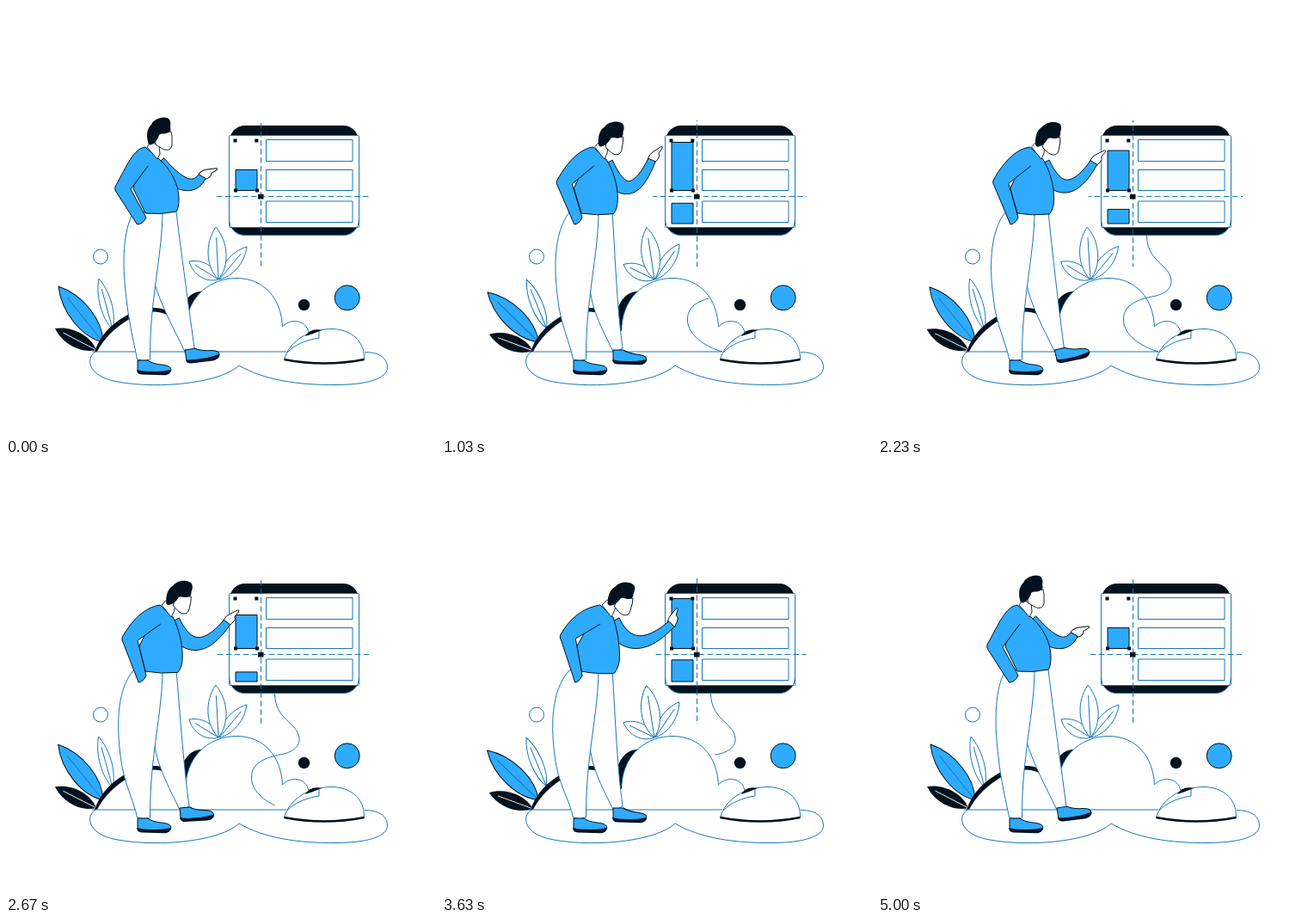
Write an HTML page that moves like this. It is 500 px wide and 500 px high and loops after 5.03 s.

```html
<!DOCTYPE html>
<html lang="en">
<head>
<meta charset="utf-8">
<title>Interface designer</title>
<style>
  html, body { margin: 0; height: 100%; overflow: hidden; background: #fff; }
  svg { display: block; width: 100vw; height: 100vh; }
  .line { fill: none; stroke: #0b70b5; stroke-width: .95; }
  .white { fill: #fff; stroke: #0b70b5; stroke-width: .95; }
  .blue { fill: #2eabff; stroke: #00121e; stroke-width: 1; stroke-linejoin: round; }
  .skin { fill: #fff; stroke: #00121e; stroke-width: .9; stroke-linejoin: round; }
  .dark { fill: #00121e; }
  .ink { fill: none; stroke: #00121e; stroke-width: 1; }
</style>
</head>
<body>
<svg viewBox="0 0 500 500">
  <g id="plantL"></g>
  <g id="plantR"></g>

  <!-- ground and hills -->
  <path class="line" d="M104 402C92 410 95 431 130 437C180 446 250 438 271 418C300 435 340 441 385 440.500C430 440 443.500 430 443.500 420C443 408 432 402.500 417 402.500"/>
  <path class="dark" d="M103 402C112 373 145 351 172 351C184 351 196 356 212 376V402Z"/>
  <path fill="#fff" d="M106 402C116 381 145 356.500 172 355.500C187 356 198 364 212 382V402Z"/>
  <path class="dark" d="M200 375C202 343 214 330 233 331.500L214 375Z"/>
  <path fill="#fff" d="M209 402V372C212 335 240 316.500 268 316.500C300 316.500 320 340 322 372V402Z"/>
  <path class="line" d="M209 372C212 335 240 316.500 268 316.500C300 316.500 320 340 321.500 373C330 363 349 364 352 380M100 402H326"/>
  <path id="cable" class="line" pathLength="1" d="M326 402C305 396 285.500 382 285.500 365C285 346 305 341 318 338C332 336 342 329 341 319C339 300 313 298 312.500 267"/>

  <!-- mouse -->
  <path class="white" d="M323.500 411C329 391 350 375.500 380 375.500C407 377 417 394 416.500 411Q370 420 323.500 411Z"/>
  <path d="M323.500 411Q370 420 416.500 411" fill="none" stroke="#00121e" stroke-width="2.400"/>
  <path class="line" d="M327 403C335 394 350 388 364 386V378"/>
  <path class="dark" d="M348 384Q354 374 367 377L357 381Z"/>

  <circle class="white" cx="110" cy="291.500" r="8.500"/>
  <circle class="dark" cx="346.500" cy="347.500" r="6.700"/>
  <circle class="blue" cx="396.700" cy="339.300" r="14.500"/>

  <!-- screen -->
  <rect class="dark" x="260" y="139" width="150" height="127.500" rx="18"/>
  <rect class="white" x="259.500" y="150.500" width="151" height="107" rx="1"/>
  <path class="line" d="M259.500 248C260 259 267 266.500 278 266.500H392C403 266.500 410 259 410.500 248M302.500 155.500H403V180.500H302.500ZM302.500 190.500H403V214.500H302.500ZM302.500 227H403V251.500H302.500Z"/>
  <rect id="barTop" class="blue" x="267" width="25"/>
  <rect id="barLow" class="blue" x="267" width="25"/>
  <path class="dark" d="M264.500 154.500h4v4h-4zM289.300 154.500h4v4h-4zM265 212.500h4v4h-4zM290 212.500h4v4h-4z"/>
  <g class="line" stroke-dasharray="6.500 3.500">
    <path id="dashH" d="M245 221.500H424"/>
    <path id="dashV" d="M296.500 133V303"/>
  </g>
  <rect class="dark" x="293" y="218.800" width="6.500" height="5.700"/>

  <!-- man -->
  <path id="legFront" class="white"/>
  <g id="shoeFront"></g>
  <path id="legBack" class="white"/>
  <g id="shoeBack" transform="translate(153 412)"></g>
  <path id="hand" class="skin" d="M-2 -4.500Q5 -6.500 9 -4.500L19 -1Q20.500 .5 18 1L11 1.500Q10 5 5 5L-2 4.500Z"/>
  <path id="armFar" class="blue"/>
  <path id="torso" class="blue"/>
  <path id="neck" class="skin"/>
  <path id="armNear" class="blue"/>
  <path id="crease" class="ink"/>
  <g id="head">
    <path class="skin" d="M-4 2L14 1L15 7V17C14 23 8 24 2 20L-4 16Z"/>
    <path class="dark" d="M-13 13C-15 5 -14 -3 -9 -7C-7 -13 3 -17 9 -15C13 -14 14 -9 13 -5C14 -1 13 2 11 2C6 5 3 2 0 5C-1 10 -6 16 -10 16.500C-12 16 -13 15 -13 13Z"/>
  </g>
</svg>
<script>
const LOOP = 5030, HALF = LOOP / 2;
const $ = id => document.getElementById(id);
const set = (id, attrs) => {
  for (const k in attrs) $(id).setAttribute(k, attrs[k]);
};

function leaf(x, y, tx, ty, w, cls, vein = 'line') {
  const dx = tx - x, dy = ty - y, l = Math.hypot(dx, dy);
  const at = (k, side) => `${x + dx * k - dy / l * w * side} ${y + dy * k + dx / l * w * side}`;
  return `<path class="${cls}" d="M${x} ${y}C${at(.25, 1)} ${at(.7, 1)} ${tx} ${ty}C${at(.7, -1)} ${at(.25, -1)} ${x} ${y}Z"/>
    <path class="line" ${vein} d="M${x} ${y}L${at(.8, 0)}"/>`;
}
$('plantL').innerHTML = leaf(124, 376, 108, 317, 9, 'white', '')
  + leaf(105, 400, 57, 375, 12, 'dark', 'style="stroke:#fff"')
  + leaf(113, 391, 61, 326, 16, 'blue', '');
$('plantR').innerHTML = leaf(247, 318, 213, 297, 11, 'white', '')
  + leaf(248, 318, 280, 280, 10, 'white', '')
  + leaf(247, 318, 244, 257, 14, 'white', '');

$('shoeFront').innerHTML = $('shoeBack').innerHTML =
  '<path class="blue" d="M0 0H12C20 6 30 4 36 7C40 9 39 13 37 14L0 13Z"/>' +
  '<path class="dark" d="M-.5 11C10 14.500 25 13.500 39 11C38.500 15 36 17.300 30 17.300L5 16.500C1 16 -1 14.500 -.5 11Z"/>';

// Pose keys, joined by a cyclic monotone cubic
const TIMES = [0, 1030, 1770, 2670, 3630, 4370];
const POSE = {
  lean:   [0, 13.5, 13, 17, 22, 14.5],
  bar:    [24, 56, 55, 39, 58, 45],
  wristX: [228, 244, 246, 257, 267, 253],
  wristY: [198, 179, 180, 184, 186, 187],
  point:  [-26, -52, -45, -45, -70, -28],
  elbowX: [208, 217, 217, 222, 227, 221],
  elbowY: [207, 211, 210, 209, 207, 208],
  ankle:  [208, 199, 208, 202, 199, 202],
  tilt:   [-9, 0, -20, -5, 0, -5]
};
function pose(v, t) {
  const n = TIMES.length;
  const time = i => TIMES[(i + n) % n] + Math.floor(i / n) * LOOP;
  const val = i => v[(i + n) % n];
  const slope = i => (val(i + 1) - val(i)) / (time(i + 1) - time(i));
  const tangent = i => {
    const a = slope(i - 1), b = slope(i);
    return a * b > 0 ? 2 * a * b / (a + b) : 0;
  };
  let i = n - 1;
  while (t < TIMES[i]) i--;
  const d = time(i + 1) - time(i), u = (t - time(i)) / d, r = 1 - u;
  return val(i) * r * r * (1 + 2 * u) + val(i + 1) * u * u * (3 - 2 * u)
    + d * u * r * (tangent(i) * r - tangent(i + 1) * u);
}

// Tapered limb along a quadratic curve through the elbow
function limb(sx, sy, ex, ey, wx, wy) {
  const cx = 2 * ex - (sx + wx) / 2, cy = 2 * ey - (sy + wy) / 2;
  const left = [], right = [];
  for (let i = 0; i <= 20; i++) {
    const u = i / 20, r = 1 - u;
    const x = r * r * sx + 2 * r * u * cx + u * u * wx;
    const y = r * r * sy + 2 * r * u * cy + u * u * wy;
    const dx = r * (cx - sx) + u * (wx - cx), dy = r * (cy - sy) + u * (wy - cy);
    const k = (10.5 - 6 * u) / Math.hypot(dx, dy);
    left.push(`${x + dy * k} ${y - dx * k}`);
    right.unshift(`${x - dy * k} ${y + dx * k}`);
  }
  return 'M' + left.concat(right).join('L') + 'Z';
}

function drawMan(p) {
  const s = p.lean, a = p.ankle;
  const neckX = 162 + s, chestX = 178 + s * .95, side = 201 + s * .25;
  const elbowX = 127 + s * .48, elbowY = 211 - s * .5;

  set('legFront', { d: `M176 240L198 239C${204 - (208 - a) * .3} 290 ${a + 4} 345 ${a + 11} 398Q${a + 5} 402 ${a} 402C${a - 13} 375 ${a - 28} 348 172 320Z` });
  set('shoeFront', { transform: `translate(${a} 400) rotate(${p.tilt})` });
  const hip = 136 - s * .4;
  set('legBack', { d: `M148 240C${hip - 2} 265 ${hip} 310 ${hip + 4} 340C${hip + 7} 370 149 392 152.500 411Q160 414 167.500 411C167 340 182 290 182 238Z` });

  set('armFar', { d: limb(chestX - 2, 184, p.elbowX, p.elbowY, p.wristX, p.wristY) });
  set('hand', { transform: `translate(${p.wristX} ${p.wristY}) rotate(${p.point})` });
  set('torso', { d: `M${neckX} 164L${chestX} 178C${chestX + 14 - s * .45} 190 ${side} 208 ${side} 224Q${side} 236 ${198 + s * .1} ${239 + s * .2}Q180 ${243 + s * .08} 162 241L${148 + s * .4} 212Z` });
  set('neck', { d: `M${neckX + 6 + s * .1} 158L${neckX + 2} 164L${chestX - 2} 178L${chestX + 1} 172L${chestX + s * .2} 162Z` });
  set('armNear', { d: `M${neckX} 164C${neckX - 14} 166 ${elbowX + 14} ${elbowY - 26} ${elbowX} ${elbowY - 1}Q${elbowX - 1} ${elbowY + 2} ${elbowX + 1} ${elbowY + 5}L${152.5 + s * .1} 254Q159 254 163 246L${145 + s * .47} ${213 - s * .45}L${165 + s * .87} 186Z`, stroke: 'none', style: 'stroke:none' });
  set('crease', { d: `M${165 + s * .87} 186L${145 + s * .47} ${213 - s * .45}L163 246Q159 254 ${152.5 + s * .1} 254L${elbowX + 1} ${elbowY + 5}Q${elbowX - 1} ${elbowY + 2} ${elbowX} ${elbowY - 1}C${elbowX + 14} ${elbowY - 26} ${neckX - 14} 166 ${neckX} 164` });
  set('head', { transform: `translate(${178 + s * 1.4} ${145 + s * .3}) rotate(${s * .75})` });
}

function draw(now) {
  const t = now % LOOP, p = {};
  for (const k in POSE) p[k] = pose(POSE[k], t);

  const sway = (1 - Math.cos(t / HALF * 2 * Math.PI)) / 2;
  set('plantL', { transform: `rotate(${-7.5 * sway} 112 396)` });
  set('plantR', { transform: `rotate(${-6.2 * sway} 247 318)` });

  // The cable draws itself, then is wiped from its start
  const grow = x => Math.min(1, Math.max(0, x / 2130));
  const from = grow(t - HALF), to = grow(t);
  set('cable', {
    'stroke-dasharray': `0 ${from} ${to - from} 2`,
    visibility: to - from > .001 ? 'visible' : 'hidden'
  });

  const low = Math.max(0, (p.bar - 24) * .74);
  set('barTop', { y: 214.5 - p.bar, height: p.bar });
  set('barLow', { y: 253 - low, height: low, visibility: low > .3 ? 'visible' : 'hidden' });

  const shift = t / LOOP * 300;
  set('dashH', { 'stroke-dashoffset': shift });
  set('dashV', { 'stroke-dashoffset': -shift - 3 });

  drawMan(p);
}

const start = performance.now();
(function frame() {
  draw(performance.now() - start);
  requestAnimationFrame(frame);
})();
</script>
</body>
</html>
```
